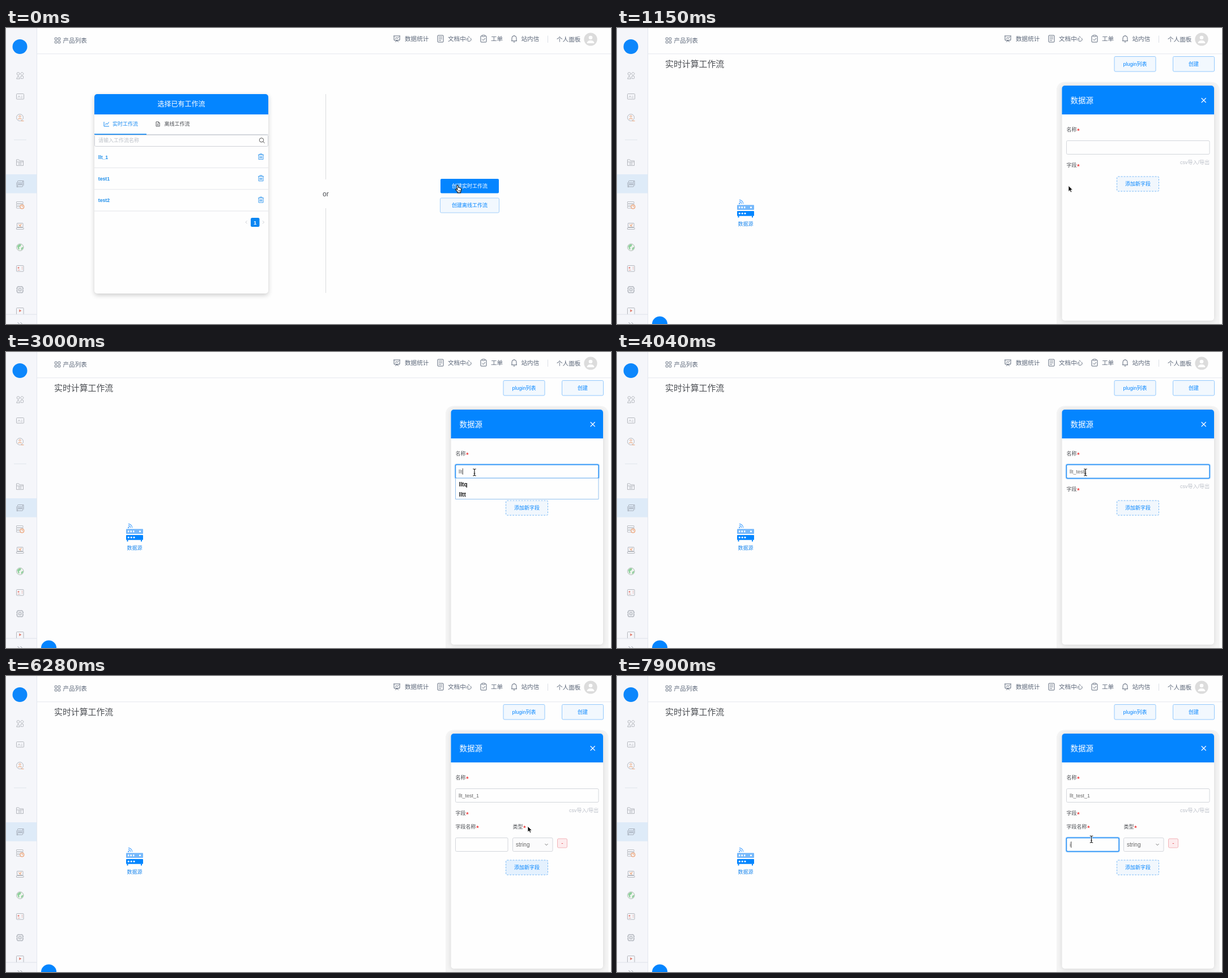
Write an HTML page with a canvas that moves like this. It is 1068 px wide and 524 px high and loops after 8000 ms.

```html
<!DOCTYPE html>
<html lang="zh-CN">
<head>
<meta charset="utf-8">
<title>工作流</title>
<style>
html, body { margin: 0; width: 100%; height: 100%; overflow: hidden; background: #fefefe; }
canvas { display: block; width: 1068px; height: 524px; }
</style>
</head>
<body>
<canvas id="stage"></canvas>
<script>
const W = 1068, H = 524, LOOP = 8000;
const BLUE = '#0485ff', INK = '#4a4d52', SLATE = '#5d687a', GRAY = '#b4b7bd', ORANGE = '#eda579';
const FONT = '"Liberation Sans", "Noto Sans CJK SC", "Noto Sans CJK", sans-serif';
const canvas = document.getElementById('stage');
const c = canvas.getContext('2d');
const dpr = window.devicePixelRatio || 1;
canvas.width = W * dpr;
canvas.height = H * dpr;

// Value of the latest step that has begun.
function step(t, list) {
  let value = list[0][1];
  for (const [start, v] of list) if (t >= start) value = v;
  return value;
}

function text(s, x, cy, size, color, align = 'left', weight = 400) {
  c.font = `${weight} ${size}px ${FONT}`;
  c.textAlign = align;
  c.fillStyle = color;
  c.fillText(s, x, cy + size * 0.37);
}

function paint(fill, stroke, width) {
  if (fill) { c.fillStyle = fill; c.fill(); }
  if (stroke) { c.strokeStyle = stroke; c.lineWidth = width; c.stroke(); }
}

function box(x, y, w, h, r, fill, stroke, width = 1) {
  c.beginPath();
  c.roundRect(x, y, w, h, r);
  paint(fill, stroke, width);
}

function disc(x, y, r, fill, stroke, width = 1) {
  c.beginPath();
  c.arc(x, y, r, 0, Math.PI * 2);
  paint(fill, stroke, width);
}

function path(d, x, y, fill, stroke, width = 1) {
  c.save();
  c.translate(x, y);
  const p = new Path2D(d);
  if (fill) { c.fillStyle = fill; c.fill(p); }
  if (stroke) { c.strokeStyle = stroke; c.lineWidth = width; c.stroke(p); }
  c.restore();
}

const line = (d, x, y, color, width = 1) => path(d, x, y, null, color, width);

function shadowed(blur, dy, color, draw) {
  c.save();
  c.shadowBlur = blur * dpr;
  c.shadowOffsetY = dy * dpr;
  c.shadowColor = color;
  draw();
  c.restore();
}

function sidebar() {
  box(0, 0, 54, H, 0, '#f5f6fa');
  box(54, 0, 1, H, 0, '#e3e7ef');
  box(0, 259, 54, 33.5, 0, '#deebf8');
  disc(24.5, 33, 13, '#0d87fc');

  disc(21.5, 81, 2.4, null, GRAY);
  path('M0-3L3 0L0 3L-3 0Z', 28.3, 81, null, GRAY);
  path('M0-3L3 2.5H-3Z', 21.5, 87.5, null, GRAY);
  box(26, 85, 4.6, 4.6, 1, null, GRAY);

  box(18.5, 116.5, 13, 9.5, 1, null, GRAY);
  line('M-4 2.5L-2-1L0 2.5M1.5 0H4M1.5 2.5H4', 25, 121, GRAY, 0.8);

  disc(24.5, 158.5, 6, null, GRAY);
  disc(24.5, 156.5, 1.6, null, ORANGE);
  line('M-2.5 3V1.5H2.5V3M2 5.5H7', 24.5, 159, ORANGE);
  box(14, 197.5, 22, 1, 0, '#dfe2e8');

  line('M-6 5.5V-5H-2L-.5-3H6V5.5ZM-6-1H6M-3 1H3M-3 3.3H3', 24.5, 238, GRAY);

  box(20.5, 270.5, 9, 3.5, 1, null, '#a3abb7');
  box(20.5, 277.5, 9, 3.5, 1, null, '#a3abb7');
  line('M-6-3V3M6-3V3M-6 0H6M-4 5.5H-6V3M4-5.5H6V-3', 25, 276, '#a3abb7', 0.9);

  for (const y of [307.5, 311.5, 315.5]) box(18.5, y, 11.5, 3.5, 0.5, null, GRAY, 0.9);
  disc(28.3, 316.5, 3.4, '#f5f6fa', ORANGE, 1.3);
  line('M0-2V.5H2', 28.3, 316, ORANGE, 0.9);

  box(19.5, 345.5, 10.5, 7, 0.5, null, GRAY);
  line('M-2.5-1.5L-.5 1L2.5-2M-1 1.5L2 2', 24.8, 349, ORANGE, 1.1);
  box(18.5, 353.5, 12.5, 3, 0.5, null, GRAY);

  disc(24.8, 388.2, 6.2, '#eef3ee', '#a9b6ae', 0.9);
  path('M-5-2Q-2-7 2-5L1-2L-2 0L-1 3L-3 4ZM2 1L6-1Q5 4 2 5Z', 24.8, 388.2, '#8fd09c');

  box(18.5, 420.5, 12.5, 10.5, 1, null, GRAY);
  disc(22, 424.5, 1.5, '#e88a80');
  line('M-5 3H-1M2-2H4M2 1H4', 25.5, 425.5, '#e5a29a');

  box(19.7, 458.2, 10, 10, 1, null, '#a3a8b0', 1.1);
  box(22.7, 461.2, 4, 4, 0, null, '#a3a8b0', 1.1);
  line('M-3-6.5V-5M0-6.5V-5M3-6.5V-5M-3 5V6.5M0 5V6.5M3 5V6.5M-6.5-2H-5M-6.5 2H-5M5-2H6.5M5 2H6.5', 24.7, 463.2, '#a3a8b0', 0.9);

  box(18.5, 495.5, 12.5, 13, 1, null, GRAY);
  path('M-1.5-2.5L2.5 0L-1.5 2.5Z', 24.8, 500.5, '#e07a6a');
  box(0, 507, 54, 17, 0, '#f5f6fa');
  box(0, 506.5, 54, 1, 0, '#dfe3eb');
  line('M-4-3L-1 0L-4 3M1-3L4 0L1 3', 24.5, 524, '#9aa0aa');
}

function header() {
  box(55, 45.3, W - 55, 1, 0, '#e4e7ed');
  for (const x of [86.2, 92]) for (const y of [17.2, 23]) box(x, y, 3.8, 3.8, 0.7, null, SLATE, 0.9);
  text('产品列表', 100.5, 22, 10.6, SLATE);

  line('M-6-5H6M-5-5V2.5H5V-5M-3 0L-1-2L1-.5L3-3M0 2.5V4M-3 5.5L0 3.5L3 5.5', 690, 19, SLATE);
  text('数据统计', 704, 19, 10.6, SLATE);
  box(762, 13, 10, 12, 1, null, SLATE);
  line('M-3-3H3M-3 0H3M-3 3H1', 767, 19, SLATE, 0.9);
  text('文档中心', 780, 19, 10.6, SLATE);
  box(838, 14, 10, 11, 1, null, SLATE);
  box(840.5, 12.7, 5, 2.4, 0.5, '#fefefe', SLATE, 0.9);
  line('M-2.5 1L-.5 3L3-1', 843, 19, SLATE);
  text('工单', 856, 19, 10.6, SLATE);
  line('M-5 3.5H5M-4 3.5V-1.5A4 4 0 0 1 4-1.5V3.5M0-5.5V-6.5M-1.5 5.5H1.5', 897, 19.3, SLATE);
  text('站内信', 909.5, 19, 10.6, SLATE);
  box(956, 13.5, 1, 12.5, 0, '#dcdfe5');
  text('个人面板', 972, 20, 10.6, SLATE);

  disc(1032, 20, 11.6, '#dcdcdc');
  disc(1032, 17, 3.3, '#fff');
  path('M-6.5 7Q-6 2 0 2Q6 2 6.5 7Z', 1032, 20, '#fff');
}

function trash(x, y) {
  line('M-5-3.3H5M-2-3.3V-5H2V-3.3M-4-3.3V4.8H4V-3.3M-1.7-1V3M0-1V3M1.7-1V3', x, y, '#2b93ee', 0.9);
}

function chooser() {
  shadowed(9, 3, 'rgba(0,0,0,.2)', () => box(156, 117, 307, 353, 5, '#fefefe'));
  box(156, 117, 307, 36, [5, 5, 0, 0], BLUE);
  text('选择已有工作流', 309.5, 135, 12, '#fff', 'center');

  line('M-4-4V4H5M-2 1.5L0-1L2 .5L4.5-3.5', 177, 170, '#1a8cf3');
  text('实时工作流', 188, 170, 9, '#1a8cf3');
  line('M-3-4H1L3.2-2V4H-3ZM1-4V-2H3M-1.5 0H1.5M-1.5 2H1.5', 268, 170, INK, 0.9);
  text('离线工作流', 279.5, 170, 9, INK);
  box(156, 188, 307, 1, 0, '#d7dae0');
  box(156, 187.2, 92, 1.8, 0, '#1a8cf3');

  box(156.5, 189.5, 306, 20, 2, '#fefefe', '#cfd2d8');
  text('请输入工作流名称', 163, 199, 9, '#bcc0c8');
  disc(451, 198.4, 3.7, null, '#555');
  line('M0 0L3 3', 453.6, 201, '#555');

  ['llt_1', 'test1', 'test2'].forEach((name, i) => {
    const y = 228.3 + 38.2 * i;
    text(name, 162.8, y, 8.7, '#1e8eea', 'left', 700);
    trash(450, y - 0.5);
    box(156, y + 18.8, 307, 1, 0, '#e4e6ea');
  });

  line('M1.5-2.5L-1 0L1.5 2.5', 424, 343.8, '#c2c6cc', 0.9);
  box(432, 336, 15.5, 16, 2.5, '#0a86f2');
  text('1', 439.7, 344, 9.5, '#fff', 'center', 700);
  line('M-1.5-2.5L1 0L-1.5 2.5', 454.5, 343.8, '#c2c6cc', 0.9);

  box(564, 117, 1, 151, 0, '#d9dbde');
  box(564, 319, 1, 150, 0, '#d9dbde');
  text('or', 564.3, 293.5, 12, INK, 'center');

  box(767, 267, 103, 25.5, 2, BLUE);
  text('创建实时工作流', 818.5, 279.3, 9, '#fff', 'center');
  box(766.5, 301, 104, 26, 2, '#f2f8fe', '#a3cffa');
  text('创建离线工作流', 818.5, 313.7, 9, BLUE, 'center');
}

function label(s, x, y) {
  text(s, x, y, 9, INK);
  text('*', x + s.length * 9 + 0.8, y + 1.6, 11, '#ee3b3b', 'left', 700);
}

// f.focus runs from 0 to 1 and sets the strength of the glow.
function field(x, y, w, value, f = {}) {
  const tone = f.error ? '210,70,95' : '30,140,245';
  if (f.focus) box(x, y, w, 24, 2, null, `rgba(${tone},${0.3 * f.focus})`, 4);
  box(x, y, w, 24, 2, '#fefefe', f.focus ? `rgb(${tone})` : '#d3d6db', f.focus ? 1.4 : 1);
  text(value, x + 5.6, y + 12, 9, '#666');
  if (f.caret) box(x + 5.8 + c.measureText(value).width, y + 6.5, 0.9, 11, 0, '#333');
}

function suggestions(items) {
  box(793.5, 223.5, 252.5, items.length * 18 + 1, 0, '#fefefe', '#93c1ee');
  items.forEach((s, i) => text(s, 799.5, 234 + 18 * i, 10, '#111', 'left', 700));
}

function addButton(y, hover) {
  c.setLineDash([3, 2]);
  box(882.5, y, 74, 26, 2, hover ? '#e4f1fe' : '#f1f7fd', '#79b9f7');
  c.setLineDash([]);
  text('添加新字段', 919.5, y + 12.8, 9, BLUE, 'center');
}

function sourceNode() {
  disc(216.2, 310.8, 1.2, '#4aa3ff');
  line('M0-4A4 4 0 0 1 4 0M0-7A7 7 0 0 1 7 0', 215.8, 311.3, '#4aa3ff', 1.2);
  box(212, 313.3, 30, 8.7, 1, '#75b8fb');
  for (const x of [215, 219.5, 224]) box(x, 316, 2.4, 3.2, 0.4, '#fff');
  disc(236.5, 317.6, 1.6, '#fff');
  box(212, 324, 30, 8.8, 1, BLUE);
  for (const x of [216.3, 221.2, 226]) disc(x, 328.3, 1.5, '#fff');
  box(213.5, 332.5, 2, 3, 0, BLUE);
  box(238, 332.5, 2, 3, 0, BLUE);
  text('数据源', 227, 347, 9, '#1d88ee', 'center');
}

function loading(t) {
  c.save();
  c.translate(564, 153.5);
  c.rotate(0.2 + (t - 650) / 190);
  [0.45, 1, 0.75, 0.6].forEach((a, i) => {
    c.rotate(Math.PI / 2);
    disc(4, 4, 2.7, `rgba(45,140,240,${a * 0.7})`);
  });
  c.restore();
  text('Loading...', 564, 172.5, 9.2, '#2d90f2', 'center');
}

function editor(t) {
  text('实时计算工作流', 85, 63.7, 14.9, INK);
  box(878, 50.5, 73, 26.5, 2, '#f2f8fe', '#92c8fd');
  text('plugin列表', 914.5, 63.5, 9, BLUE, 'center');
  box(981.5, 50.5, 73, 26.5, 2, '#f2f8fe', '#92c8fd');
  text('创建', 1018, 63.5, 9, BLUE, 'center');
  disc(75.5, 524, 13.6, BLUE);
  if (t >= 950) sourceNode();

  box(776, 95.5, 287.5, 460, 14, '#f4f4f4');
  shadowed(8, 1, 'rgba(0,0,0,.12)', () => box(785.5, 102, 268.5, 416, 5, '#fefefe'));
  box(785.5, 102, 268.5, 51, [5, 5, 0, 0], BLUE);
  text('数据源', 800.5, 128, 13.5, '#fff', 'left', 500);
  line('M-4-4L4 4M4-4L-4 4', 1035.7, 128, '#fff', 1.2);

  const error = t >= 2550 && t < 2850;
  const drop = error ? 13 : 0;
  const name = step(t, [[0, ''], [2550, 'l'], [2850, 'll'], [3000, 'llt'], [3150, 'llt_'],
    [3590, 'llt_t'], [3740, 'llt_te'], [3890, 'llt_tes'], [4040, 'llt_test'],
    [4630, 'llt_test_'], [4930, 'llt_test_1']]);
  const caret = step(t, [[0, 0], [1660, 1], [2110, 0], [2550, 1], [4490, 0], [4630, 1], [5380, 0]]);
  label('名称', 793.5, 180);
  field(793.5, 199.5, 252.5, name, { focus: t >= 1660 && t < 6280 ? 1 : 0, caret, error });
  label('字段', 793.5, 243 + drop);
  text('csv导入/导出', 1046, 238 + drop, 9, '#bbbfc8', 'right');

  const hasRow = t >= 6280;
  if (hasRow) {
    label('字段名称', 793.5, 267);
    label('类型', 894.5, 267);
    field(793.5, 286.5, 92.5, t >= 7900 ? 'i' : '', {
      focus: step(t, [[0, 0], [7010, 0.5], [7160, 1]]),
      caret: step(t, [[0, 0], [7010, 1], [7460, 0], [7900, 1]])
    });
    box(894.5, 286.5, 70.5, 24, 2, '#fbfbfc', '#d3d6db');
    text('string', 900, 298.3, 10, '#666');
    line('M-2.5-1.2L0 1.4L2.5-1.2', 954, 298.3, '#777');
    box(973.5, 288, 17, 16, 2, '#fdecee', '#f2b3b8');
    text('-', 982, 295.5, 10, '#e2484f', 'center');
  }
  addButton(hasRow ? 326 : 263 + drop, t >= 5830 && t < 6710);

  if (t >= 2550 && t < 3150) {
    const all = ['llll1', 'llll5', 'lltq', 'lltt'];
    suggestions(all.filter(s => s.startsWith(name)));
  }
}

const pointers = {
  arrow(x, y) {
    path('M0 0V10.2L2.4 8L4 11.6L5.8 10.8L4.2 7.4H7.4Z', x, y, '#000', '#fff', 0.8);
  },
  hand(x, y) {
    path('M-2-6.3Q-1.2-7.2-.3-6.3L.8-2.4Q2-3.2 2.8-2Q4-2.6 4.4-1.2Q5.6-1.4 5.6 .2Q5.7 3 4.6 5V6.6H-1V5L-4.4 1.2Q-4.6-.4-2.8 0L-1 1.2L-2.4-5Z',
      x, y, '#fff', '#111', 1.1);
    line('M1 2V4.6M2.6 2V4.6M4 2V4.4', x, y, '#111', 0.7);
  },
  beam(x, y) {
    const d = 'M-2.8-6Q0-6 0-4.5Q0-6 2.8-6M0-4.5V4.5M-2.8 6Q0 6 0 4.5Q0 6 2.8 6M-1.3 1.8H1.3';
    line(d, x, y, '#fff', 2.4);
    line(d, x, y, '#222', 1.2);
  }
};

const pointerSteps = [
  [0, ['hand', 798, 285]],
  [500, ['arrow', 797, 279.3]],
  [1210, ['arrow', 803, 264]],
  [1360, ['arrow', 818, 230]],
  [1510, ['beam', 827, 213]],
  [5380, ['arrow', 842, 222]],
  [5530, ['arrow', 886, 247]],
  [5680, ['hand', 922.5, 271.5]],
  [6280, ['arrow', 921, 266]],
  [6420, ['arrow', 893, 274]],
  [6570, ['arrow', 849, 281.3]],
  [6710, ['beam', 837.5, 289]]
];

function draw(t) {
  c.setTransform(dpr, 0, 0, dpr, 0, 0);
  c.fillStyle = '#fefefe';
  c.fillRect(0, 0, W, H);
  c.globalAlpha = step(t, [[0, 1], [500, 0.35], [650, 0.67], [800, 1]]);
  if (t < 650) chooser(); else editor(t);
  c.globalAlpha = 1;
  if (t >= 650 && t < 950) loading(step(t, [[650, 650], [800, 800]]));
  sidebar();
  header();
  const [kind, x, y] = step(t, pointerSteps);
  pointers[kind](x, y);
}

const begin = performance.now();
function tick() {
  draw((performance.now() - begin) % LOOP);
  requestAnimationFrame(tick);
}
tick();
</script>
</body>
</html>
```
